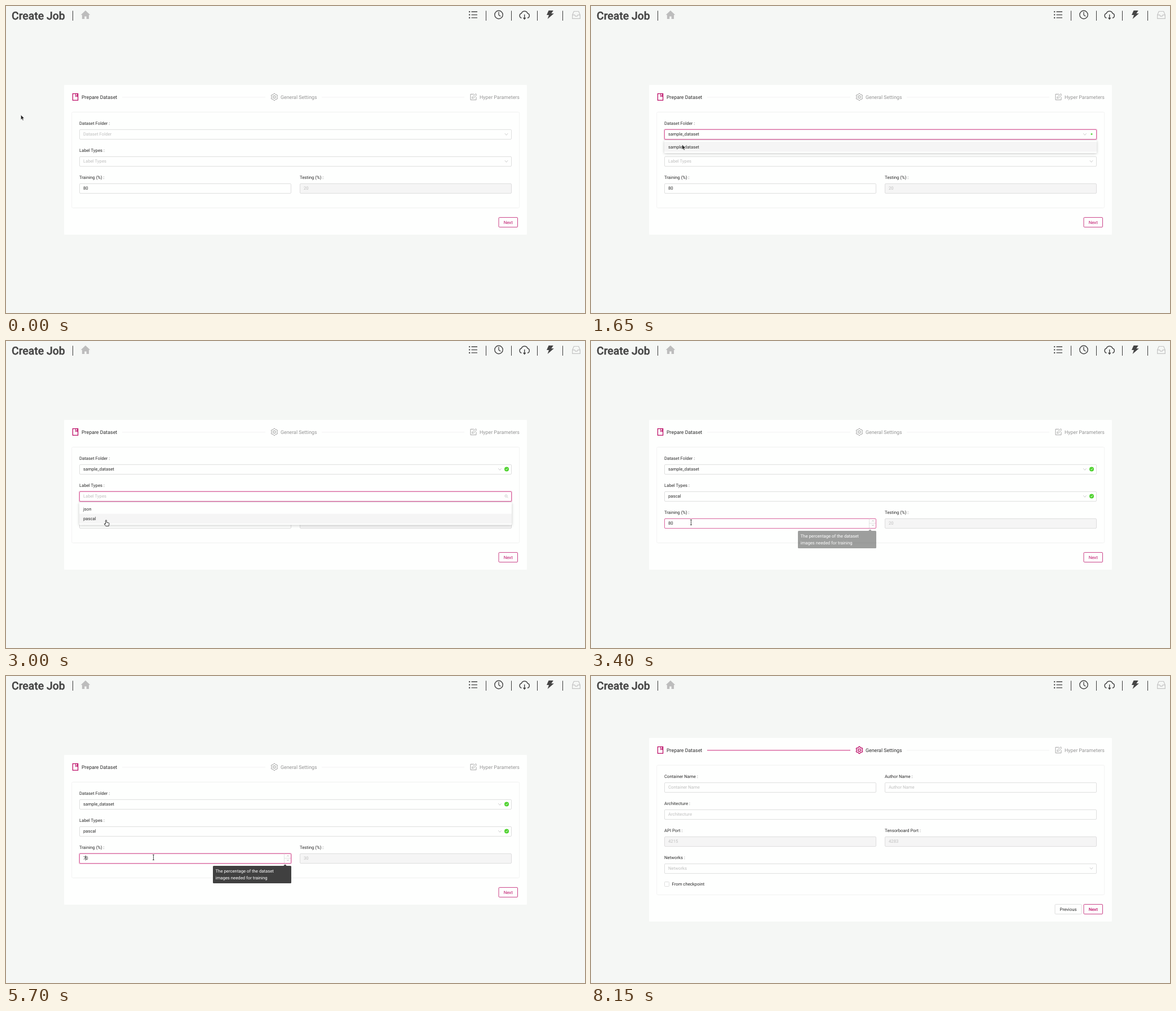
These frames come from a looping animation (1027 px wide and 545 px high, 8400 ms). An HTML page:

```html
<!DOCTYPE html>
<html lang="en">
<head>
<meta charset="utf-8">
<title>Create Job</title>
<style>
html, body { margin: 0; width: 100%; height: 100%; overflow: hidden; background: #f5f7f5; }
svg { display: block; }
text { font: 7.75px Roboto, sans-serif; fill: #2b2b2b; white-space: pre; text-rendering: geometricPrecision; }
.shadow { filter: drop-shadow(0 1.2px 2.6px rgba(0, 0, 0, .22)); }
</style>
</head>
<body>
<svg id="stage" width="1027" height="545" viewBox="0 0 1027 545"></svg>
<script>
const LOOP = 8400;
const PINK = '#bd1069', FOCUS = '#dc4791', LINE = '#d6d6d6', PALE = '#efefef';
const PAPER = '#fefffe', HINT = '#bfbfbf', MUTED = '#949494', INK = '#2b2b2b', DARK = '#454545';
const stage = document.getElementById('stage');

const clamp = v => Math.min(1, Math.max(0, v));
const ease = v => v * v * (3 - 2 * v);
const ramp = (t, from, length = 200) => ease(clamp((t - from) / length));
const pop = (t, from, length = 250) => 1 - (1 - clamp((t - from) / length)) ** 2;
const pulse = (t, from, to, length = 200) => ramp(t, from, length) * (1 - ramp(t, to, length));
const within = (t, from, to) => t >= from && t < to;

const rect = (x, y, w, h, fill, stroke = 'none', r = 1.5, width = 1) =>
  `<rect x="${x}" y="${y}" width="${w}" height="${h}" rx="${r}" fill="${fill}" stroke="${stroke}" stroke-width="${width}"/>`;
const path = (d, stroke, width = 1, fill = 'none') =>
  `<path d="${d}" stroke="${stroke}" stroke-width="${width}" fill="${fill}"/>`;
const text = (x, y, s, fill = INK, style = '') =>
  `<text x="${x}" y="${y + 2.75}" style="fill:${fill};${style}">${s}</text>`;
const at = (x, y, body, scale = 1) => `<g transform="translate(${x} ${y}) scale(${scale})">${body}</g>`;
const fade = (opacity, body) => opacity > 0 ? `<g opacity="${opacity}">${body}</g>` : '';

const chevron = (x, y) => path(`M${x - 2.7} ${y - 1.4}l2.7 3.2l2.7-3.2`, HINT, .8);
const check = (x, y, scale = 1) => scale > 0 ? at(x, y,
  '<circle r="4" fill="#4fd22f"/>' + path('M-1.7 0l1.3 1.4l2.2-2.7', '#fff', .9), scale) : '';
const search = (x, y) => path(`M${x + 1} ${y + 1}l2 2M${x + 1.5} ${y - .4}a2 2 0 1 0-4 0a2 2 0 1 0 4 0`, HINT, .8);

function field(x, y, w, label, value, { hint, disabled, focus = 0, hover = 0 } = {}) {
  const top = y + 11.4;
  return text(x, y, label + ' :') +
    fade(focus * .28, rect(x - .4, top - .9, w + .8, 19, 'none', PINK, 2, 1.1)) +
    rect(x + .5, top, w - 1, 17.2, disabled ? '#f5f5f5' : PAPER, LINE, 1.5, .8) +
    fade(Math.max(focus, hover), rect(x + .5, top, w - 1, 17.2, 'none', FOCUS, 1.5, .8)) +
    text(x + 7, y + 19.5, value, hint || disabled ? HINT : INK);
}

function dropdown(y, options, active, open) {
  if (open <= 0) return '';
  const body = rect(130, 0, 767, options.length * 17.7 + 4.6, PAPER) +
    rect(130, 2.3 + active * 17.7, 767, 17.7, '#f5f5f5', 'none', 0) +
    options.map((s, i) => text(137, 11.2 + i * 17.7, s)).join('');
  return `<g class="shadow" opacity="${open}" transform="translate(0 ${y}) scale(1 ${.8 + .2 * open})">${body}</g>`;
}

function button(x, y, w, label, color, border, weight = 400) {
  return rect(x + .5, y + .4, w - 1, 17.2, PAPER, border, 1.5, .8) +
    text(x + w / 2, y + 9.1, label, color, `text-anchor:middle;font-weight:${weight}`);
}

function header() {
  const bars = [118.5, 851.5, 896.5, 942.5, 987.5].map(x => `M${x} 8.5V26`).join('');
  return `<text x="10" y="24" style="font-size:19.4px;font-weight:500;fill:${DARK};stroke:${DARK};stroke-width:.4">Create Job</text>` +
    path(bars, '#3a3a3a') +
    path('M141 8l8.3 7.7h-2.2V23h-4.4v-4.6h-3.4V23h-4.4v-7.3h-2.2z', 'none', 0, '#bdbdbd') +
    path('M825.5 10.3H836M825.5 15.6H836M825.5 20.9H836', DARK, 1.4) +
    path('M821 10.3h2.2M821 15.6h2.2M821 20.9h2.2', DARK, 2) +
    `<circle cx="874" cy="15.5" r="7.2" fill="none" stroke="${DARK}" stroke-width="1.4"/>` +
    path('M874 10.5v5.4l3.3 2.3', DARK, 1.3) +
    path('M914.5 21.2a4.2 4.2 0 0 1-.2-8.2a5.8 5.8 0 0 1 10.8 0a4.2 4.2 0 0 1-.2 8.2', DARK, 1.5) +
    path('M919.7 15v7', DARK, 1.4) + path('M916.8 20.8h5.8l-2.9 3.6z', 'none', 0, DARK) +
    path('M962.5 8h8.3l-3.5 5.3h4.6l-11.3 9.6l2.4-6.8h-4z', 'none', 0, DARK) +
    path('M1004.7 15.8l2.6-6.3h8.4l2.6 6.3v6.5h-13.6zh4l1.2 2.3h3.2l1.2-2.3h4', '#c4c4c4', 1.2);
}

const gear = (color, width) => path([...Array(48).keys()].map(i => {
  const a = i / 48 * 2 * Math.PI, r = 5.4 + .7 * Math.tanh(2.5 * Math.cos(6 * a + Math.PI));
  return `${i ? 'L' : 'M'}${(r * Math.cos(a)).toFixed(2)} ${(r * Math.sin(a)).toFixed(2)}`;
}).join('') + 'zM2.2 0a2.2 2.2 0 1 0-4.4 0a2.2 2.2 0 1 0 4.4 0', color, width);

function steps(y, done) {
  const title = (x, s, color) => text(x, y + .3, s, color, 'font-size:8.86px');
  const second = (icon, ink, width) => at(476, y, gear(icon, width)) + title(487, 'General Settings', ink);
  const rule = y + .4;
  return path(`M206 ${rule}H460M560 ${rule}H813`, PALE, .8) +
    at(123, y, path('M-4.6-5.8h9.2v11.6h-9.2z', PINK, 1.3) + path('M.7-5.5v4.6l1.5-1.2l1.5 1.2v-4.6', PINK, 1.1)) +
    title(134, 'Prepare Dataset', INK) +
    fade(1 - done, second(MUTED, MUTED, 1)) +
    fade(done, second(PINK, INK, 1.35) + path(`M206 ${rule}H460`, '#d0277c', 1)) +
    at(829, y, path('M1-5H-5V5.2H5V0M-2.2 2.4l.4-2.3L4.2-5.7l1.8 1.8L0 2z', '#a6a6a6', 1)) +
    title(840, 'Hyper Parameters', MUTED);
}

function panel(y, h, done) {
  return rect(103, y, 821, h, PAPER) + steps(y + 21.5, done) +
    rect(116.7, y + 48.4, 794, h - 96, 'none', PALE, 2, .8);
}

function numberBox(t) {
  const value = t < 5400 ? '80' : t < 5550 ? '0' : '70';
  const rest = t < 5400 ? '20' : t < 5550 ? '99' : '30';
  const hover = pulse(t, 3250, 6200, 150), focus = pulse(t, 4050, 6550);
  let s = field(130, 304, 376, 'Training (%)', value, { focus, hover }) +
    field(521, 304, 376, 'Testing (%)', rest, { disabled: true });
  s += check(497, 323, pop(t, 6200));
  s += fade(hover, path('M493.5 315.5V332M494 323.5H505', LINE, .7) +
    path('M498.3 320.2l1.7-1.6l1.7 1.6M498.3 326.2l1.7 1.6l1.7-1.6', MUTED, .7));
  const caret = within(t, 4050, 4550) ? 146 : within(t, 4650, 5150) || within(t, 5550, 6050) ? 141.4 :
    within(t, 5400, 5550) ? 137 : 0;
  if (caret) s += path(`M${caret} 318.5V327.5`, '#222', .8);
  return s;
}

function tooltip(t) {
  return fade(pulse(t, 3300, 6250), rect(367, 337, 139, 31, '#404040') +
    path('M492 337.2l3-3l3 3z', 'none', 0, '#404040') +
    text(371.5, 346.2, 'The percentage of the dataset', '#fff') +
    text(371.5, 358.4, 'images needed for training', '#fff'));
}

// Icons at the right end of a select box
const status = (t, y, opened, chosen) => t >= chosen ? chevron(876, y) + check(888, y, pop(t, chosen)) :
  t >= opened ? search(887.5, y) : chevron(887.5, y);

function datasetPage(t) {
  const chosen = t >= 1600, typed = t >= 3050;
  return panel(140, 266, 0) +
    field(130, 208, 767, 'Dataset Folder', chosen ? 'sample_dataset' : 'Dataset Folder',
      { hint: !chosen, focus: pulse(t, 800, 1700, 250), hover: pulse(t, 750, 1700) }) +
    field(130, 256, 767, 'Label Types', typed ? 'pascal' : 'Label Types',
      { hint: !typed, focus: pulse(t, 2400, 3100, 250), hover: pulse(t, 2250, 3100) }) +
    status(t, 227.5, 800, 1600) + status(t, 275.5, 2400, 3050) +
    numberBox(t) + button(873.5, 375, 34.5, 'Next', PINK, PINK) +
    dropdown(238.7, ['sample_dataset'], 0, pulse(t, 800, 1650)) +
    dropdown(286.6, ['json', 'pascal'], t < 2700 ? 0 : 1, pulse(t, 2400, 3050)) + tooltip(t);
}

function settingsPage(t) {
  const box = (x, y, w, label, value = label) => field(x, y, w, label, value, { hint: true, disabled: value !== label });
  return panel(110, 326, ramp(t, 7600, 300)) +
    box(130, 178, 376, 'Container Name') + box(521, 178, 376, 'Author Name') +
    box(130, 226, 767, 'Architecture') +
    box(130, 274, 376, 'API Port', '4215') + box(521, 274, 376, 'Tensorboard Port', '4283') +
    box(130, 322, 767, 'Networks') + chevron(887.5, 341.3) +
    rect(130.5, 365.5, 8, 8, PAPER, LINE, 1, .8) + text(143.5, 369.7, 'From checkpoint') +
    button(822.5, 405, 48, 'Previous', INK, LINE) + button(873.5, 405, 34.5, 'Next', PINK, PINK, 500);
}

// Pointer moves: start, end, x, y, optional curve control point
const moves = [
  [200, 800, 158, 228, 80, 122], [1200, 1500, 161.5, 246], [2050, 2350, 165, 274],
  [2500, 2850, 177.5, 318], [3100, 3300, 177.5, 322], [3700, 4000, 140.5, 322],
  [4400, 4900, 261.5, 322], [6100, 6900, 830, 402, 450, 436],
  [6900, 7200, 889, 388, 868, 402], [7350, 7400, 889, 384]
];
const shapes = {
  arrow: path('M0 0V8.7L2 6.9L3.4 10L4.9 9.4L3.6 6.3H6.3z', '#fff', .6, '#222'),
  hand: path('M-1 1q0-1 1-1t1 1v3.2l3.5.6q1.1.2 1 1.4l-.8 4.3h-5.3l-2.7-3.7q.3-1.2 2.3.2z', '#222', .9, '#fff'),
  beam: path('M-1.5-4.5h3M0-4.5v9M-1.5 4.5h3', '#222', .8)
};

function pointer(t) {
  if (t >= 7600) return '';
  let x = 26.3, y = 193.3;
  for (const [from, to, ex, ey, cx = (x + ex) / 2, cy = (y + ey) / 2] of moves) {
    if (t < from) break;
    const p = ramp(t, from, to - from), q = 1 - p;
    x = q * q * x + 2 * p * q * cx + p * p * ex;
    y = q * q * y + 2 * p * q * cy + p * p * ey;
  }
  const hand = within(t, 740, 1600) || within(t, 2250, 3200) || t >= 7350;
  const shape = hand ? 'hand' : within(t, 3200, 6250) ? 'beam' : 'arrow';
  return at(x, y, shapes[shape]);
}

const topBar = header();
function draw(now) {
  const t = now % LOOP;
  stage.innerHTML = topBar + (t < 7550 ? datasetPage(t) : settingsPage(t)) + pointer(t);
  requestAnimationFrame(draw);
}
draw(0);
</script>
</body>
</html>
```
